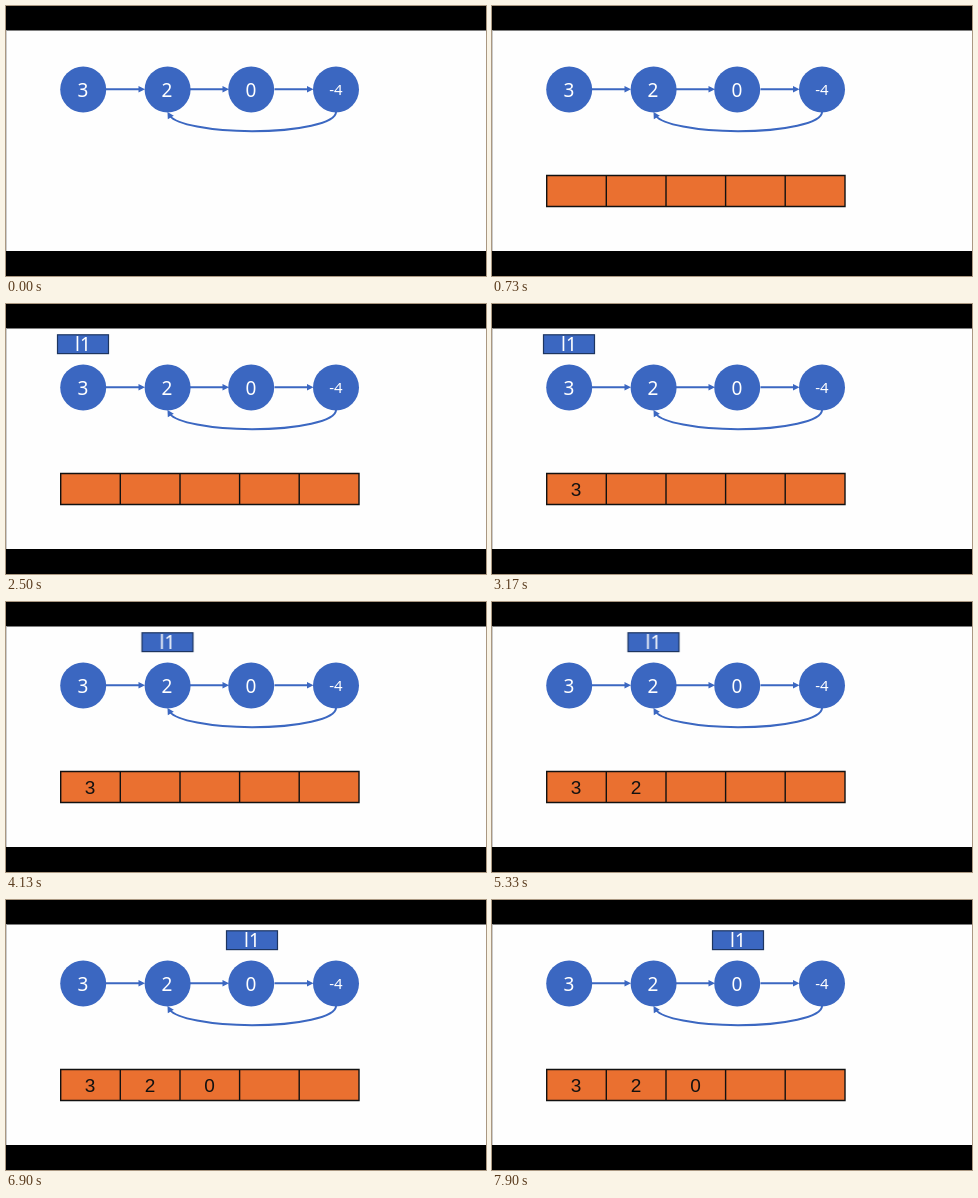
Recreate the animation shown at these times as an HTML page. Size 480 by 270 pixels, loop 8000 ms.

```html
<!DOCTYPE html>
<html lang="en">
<head>
<meta charset="utf-8">
<title>Linked list with a cycle</title>
<style>
  html, body { margin: 0; width: 100%; height: 100%; overflow: hidden; background: #000; }
  svg { display: block; width: 100vw; height: 100vh; }
  text { font-family: "Noto Sans", "Open Sans", sans-serif; font-size: 19px; text-anchor: middle; }
  .node circle { fill: #3b67c1; }
  .node text, .pointer text { fill: #fff; }
  .node .small { font-size: 15px; }
  .link { fill: none; stroke: #3b67c1; stroke-width: 2; }
  .head { fill: #3b67c1; }
  .cells { fill: #ea7030; stroke: #111; stroke-width: 1.4; }
  .value { fill: #111; font-family: "Liberation Sans", Arial, sans-serif; }
  .pointer rect { fill: #3b67c1; stroke: #1d3560; stroke-width: 1.2; }

  /* Every step is a hard cut, about 1.06 s apart. */
  .cells, .value, .pointer { animation: 8s step-end infinite; }
  .cells { animation-name: cells; }
  .pointer { animation-name: pointer; }
  .first { animation-name: first; }
  .second { animation-name: second; }
  .third { animation-name: third; }
  @keyframes cells { 0% { opacity: 0 } 6.75%, 100% { opacity: 1 } }
  @keyframes first { 0% { opacity: 0 } 33.25%, 100% { opacity: 1 } }
  @keyframes second { 0% { opacity: 0 } 59.75%, 100% { opacity: 1 } }
  @keyframes third { 0% { opacity: 0 } 86%, 100% { opacity: 1 } }
  @keyframes pointer {
    0% { opacity: 0; transform: translateX(0) }
    20% { opacity: 1; transform: translateX(0) }
    46.5% { opacity: 1; transform: translateX(84.5px) }
    73%, 100% { opacity: 1; transform: translateX(169px) }
  }
</style>
</head>
<body>
<svg viewBox="0 0 480 270">
  <defs>
    <g id="arrow">
      <path class="link" d="M100 83.2H134"/>
      <path class="head" d="M139 83.2l-6.5 -3.3v6.6z"/>
    </g>
  </defs>

  <rect y="24.5" width="480" height="220.5" fill="#fefefe"/>
  <path d="M.5 24.5V245" stroke="#ccc"/>

  <use href="#arrow"/>
  <use href="#arrow" x="84"/>
  <use href="#arrow" x="168.5"/>
  <path class="link" d="M330 106C330 117 292 125.2 246 125.2C203 125.2 170 118 164 110"/>
  <path class="head" d="M161.5 106l.3 7.3l6 -3.6z"/>

  <g class="node"><circle cx="77.2" cy="83.5" r="23"/><text x="77" y="90.8">3</text></g>
  <g class="node"><circle cx="161.6" cy="83.5" r="23"/><text x="161" y="90.8">2</text></g>
  <g class="node"><circle cx="245.2" cy="83.5" r="23"/><text x="245" y="90.8">0</text></g>
  <g class="node"><circle cx="330" cy="83.5" r="23"/><text class="small" x="330" y="89">-4</text></g>

  <path class="cells" d="M54.7 169.5H353V200.5H54.7ZM114.3 169.5v31M174 169.5v31M233.6 169.5v31M293.2 169.5v31"/>
  <text class="value first" x="84" y="192.3">3</text>
  <text class="value second" x="144" y="192.3">2</text>
  <text class="value third" x="203.5" y="192.3">0</text>

  <g class="pointer">
    <rect x="51.5" y="30.8" width="51" height="18.8"/>
    <text x="77" y="47.4">l1</text>
  </g>
</svg>
</body>
</html>
```
